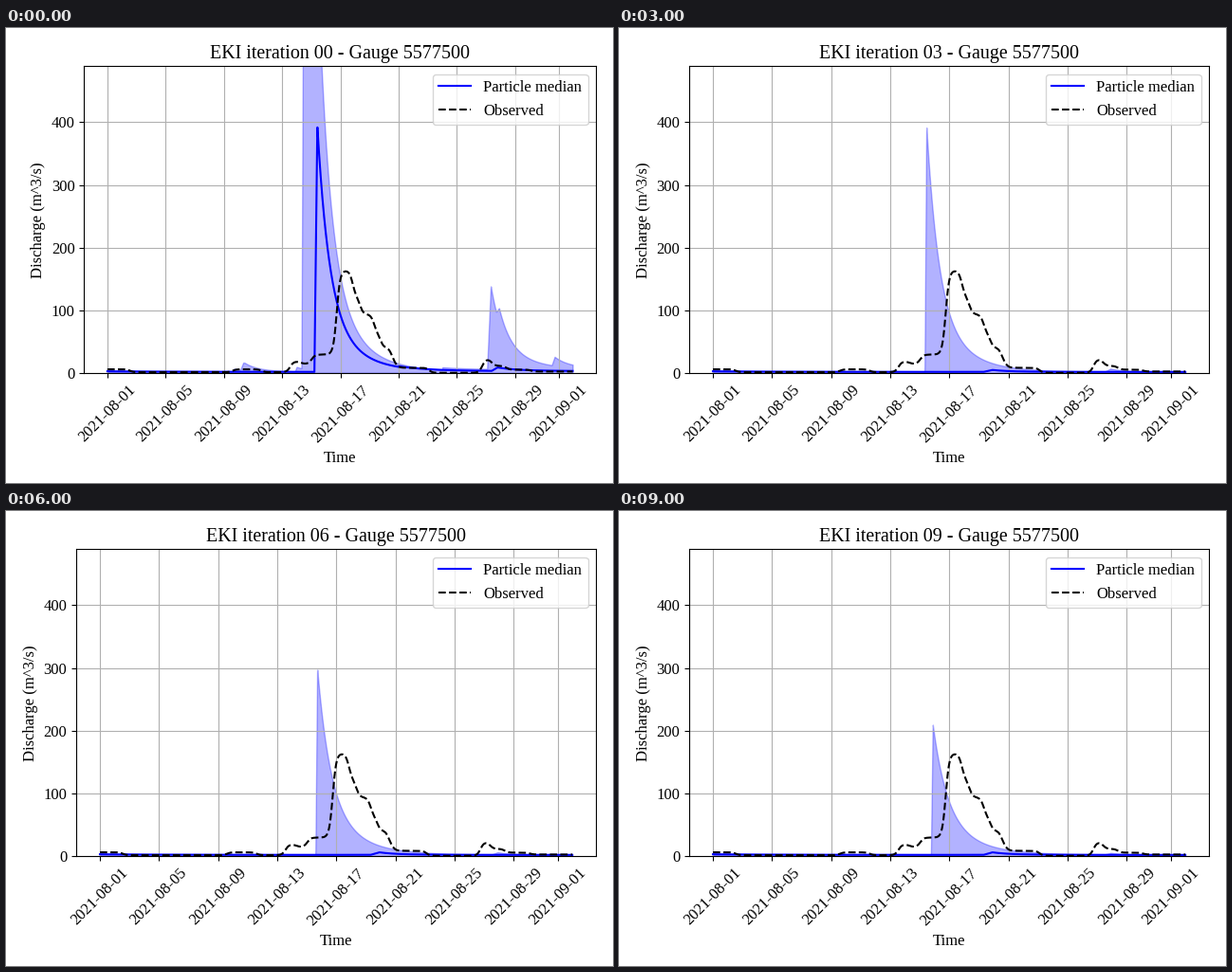
Animation of 640 by 480 pixels, one loop 10 s. Source, as a matplotlib script:

```python
import numpy as np
import matplotlib.pyplot as plt
from matplotlib.animation import FuncAnimation

W, H, DPI = 640, 480, 100
TOP, BOTTOM, RIGHT = 40.3, 364.4, 622.0
END = 31 + 23 / 24
t = np.linspace(0, END, 3069)

plt.rcParams.update({"font.family": "Liberation Serif", "font.size": 12})


def wave(day, peak, rise=0.12, hold=0.0, stretch=1.0):
    """Straight rise, optional plateau, then a two-speed recession from `day`."""
    up = np.clip((t - day + hold + rise) / rise, 0, 1)
    dt = np.maximum(t - day, 0) / stretch
    return peak * up * (0.76 * np.exp(-1.2 * dt) + 0.24 * np.exp(-0.45 * dt))


def steps(level, changes, width=0.12):
    """A level that moves by smooth steps, given as (day, change)."""
    return level + sum(c / (1 + np.exp((d - t) / width)) for d, c in changes)


observed = steps(6.6, [
    (1.55, -4.6), (8.6, 4.5), (10.6, -4.5), (12.55, 17), (13.3, -4),
    (14.03, 15), (15.75, 134), (16.85, -42), (17.35, -28), (18.32, -30),
    (18.75, -23), (19.55, -25), (19.85, -7), (22.1, -8), (25.75, 22),
    (26.4, -11), (27.4, -6), (29.1, -3)])

base = 2.4 + np.exp(-t / 5)


def usual(day, peak, stretch=1.0):
    late = wave(26.9, peak / 80, rise=0.4)
    return base + wave(day, peak - 3, stretch=stretch) + late


def low_median(top):
    return base + wave(18.9, top - 2.4, rise=0.6, stretch=1.3)


wide_start = (base + wave(9.43, 12, rise=0.2, hold=0.1) + wave(8.7, 5)
              + wave(13, 7) + wave(14.4, 660, hold=0.95)
              + wave(26.33, 132, rise=0.25) + wave(26.9, 22, rise=0.2)
              + wave(30.72, 14, rise=0.2) + 4 * (t > 23))
wide_again = (base + wave(14.2, 660, hold=0.45) + wave(26.52, 34, rise=0.25)
              + wave(27.4, 13, rise=0.2) + wave(31.1, 3, rise=0.2))
median_start = (base + wave(14.42, 392, rise=0.2)
                + wave(26.8, 5.5, rise=0.4, stretch=1.5) + 1.2 * (t > 20))

# left edge of the axes, upper bound, median; one row per iteration
states = [
    (82.4, wide_start, median_start),
    (74.35, usual(15.04, 168, 1.2), low_median(5.5)),
    (74.1, usual(14.75, 270, 1.1), low_median(5.5)),
    (74.1, usual(14.44, 395), low_median(5.5)),
    (82.6, wide_again, low_median(6.5)),
    (74.35, usual(14.95, 187, 1.2), low_median(6.5)),
    (74.1, usual(14.7, 300, 1.1), low_median(6.5)),
    (74.1, usual(14.38, 450), low_median(7.5)),
    (74.1, usual(14.6, 330, 1.1), low_median(7)),
    (74.1, usual(14.87, 211, 1.2), low_median(6.5)),
]

ticks = [*range(0, 29, 4), 31]
labels = [str(np.datetime64("2021-08-01") + d) for d in ticks]

fig = plt.figure(figsize=(W / DPI, H / DPI), dpi=DPI)
ax = fig.add_subplot()


def draw(i):
    left, upper, median = states[i]
    ax.clear()
    ax.set_position([left / W, 1 - BOTTOM / H,
                     (RIGHT - left) / W, (BOTTOM - TOP) / H])
    ax.fill_between(t, 1, upper, color="blue", alpha=0.3)
    ax.plot(t, median, color="blue", label="Particle median")
    ax.plot(t, observed, "k--", label="Observed")
    ax.set_xlim(-0.05 * END, 1.05 * END)
    ax.set_ylim(0, 489)
    ax.set_xticks(ticks, labels, rotation=45)
    ax.set_yticks(range(0, 401, 100))
    ax.set_xlabel("Time")
    ax.set_ylabel("Discharge (m^3/s)")
    ax.set_title(f"EKI iteration {i:02d} - Gauge 5577500")
    ax.grid(True)
    ax.legend(loc="upper right")
    return []


anim = FuncAnimation(fig, draw, frames=len(states), init_func=lambda: draw(0),
                     interval=1000, repeat=True, repeat_delay=0)
plt.show()
```
